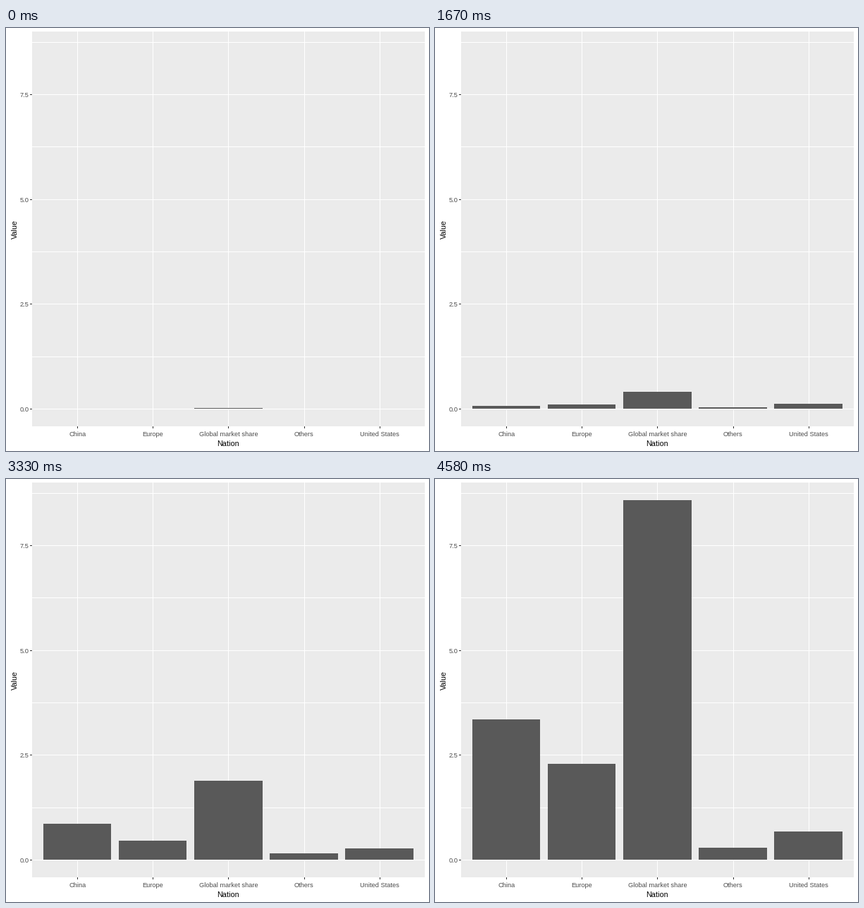
A matplotlib script for the animation above (5000 ms loop, 600 by 600 pixels).

```python
import numpy as np
import matplotlib.pyplot as plt
from matplotlib.animation import FuncAnimation
from matplotlib.patches import Rectangle

SIZE, DPI = 600, 100
LOOP, TICK, YEARS = 5000, 20, 12
LEFT, TOP, RIGHT, BOTTOM = 37, 5, 594, 565
ZERO, UNIT = 540.43, 59.43   # pixel row of value 0, pixels per unit
STEP = (RIGHT - LEFT) / 5.2  # distance between categories

# Growth starts from nothing shortly before year 0; in between the key years
# the square root of each value rises evenly.
START = -0.75
KEY_YEARS = (4, 7, 9, 10, 11)
KEY_VALUES = {
    "China": (.07, .65, 1.11, 1.2, 3.35),
    "Europe": (.1, .32, .59, 1.4, 2.29),
    "Global market share": (.41, 1.37, 2.49, 4.11, 8.58),
    "Others": (.04, .12, .17, .17, .29),
    "United States": (.12, .2, .34, .31, .67),
}

plt.rcParams["font.family"] = "Liberation Sans"
fig = plt.figure(figsize=(SIZE / DPI, SIZE / DPI), dpi=DPI, facecolor="white")
ax = fig.add_axes([0, 0, 1, 1])
ax.set_xlim(0, SIZE)
ax.set_ylim(SIZE, 0)
ax.axis("off")


def row(value):
    return int(ZERO - UNIT * value)


def growth(keys, year):
    roots = np.sqrt((0, *keys))
    return np.interp(year, (START, *KEY_YEARS), roots) ** 2


def box(x0, y0, x1, y1, color, z=1):
    patch = Rectangle((x0, y0), x1 - x0, y1 - y0, fc=color, lw=0,
                      antialiased=False, zorder=z)
    return ax.add_patch(patch)


def label(x, y, text, px, color, ha="center", **kw):
    ax.text(x, y, text, fontsize=px * 72 / DPI, color=color, ha=ha,
            va="baseline", **kw)


box(LEFT, TOP, RIGHT, BOTTOM, "#EBEBEB")

for i in range(8):
    value = 1.25 * i
    y = row(value)
    box(LEFT, y, RIGHT, y + 1, "white", 2)
    if i % 2 == 0:
        box(34, y, LEFT, y + 1, "#333333", 2)
        label(32.3, y + 4.3, f"{value:.1f}", 9.3, "#4D4D4D", ha="right")

bars = []
for i, name in enumerate(KEY_VALUES):
    center = LEFT - 0.1 + STEP * (i + 0.6)
    half = 0.45 * STEP
    x = round(center)
    box(x, TOP, x + 1, BOTTOM, "white", 2)
    box(x, BOTTOM, x + 1, BOTTOM + 3, "#333333", 2)
    label(center + 0.2, 579.2, name, 9.3, "#4D4D4D")
    bars.append(box(round(center - half), row(0), round(center + half), row(0),
                    "#595959", 3))

label(315, 593, "Nation", 10.7, "black")
label(16, 285.5, "Value", 10.7, "black", rotation=90, rotation_mode="anchor")


def draw(frame):
    # the small lead lands each jump on the nearest tick
    year = int((frame * TICK + 15) * YEARS / LOOP)
    for bar, keys in zip(bars, KEY_VALUES.values()):
        top = row(growth(keys, year))
        bar.set_y(top)
        bar.set_height(row(0) - top)
    return bars


anim = FuncAnimation(fig, draw, frames=LOOP // TICK, interval=TICK,
                     repeat=True, repeat_delay=0, blit=False)
plt.show()
```
